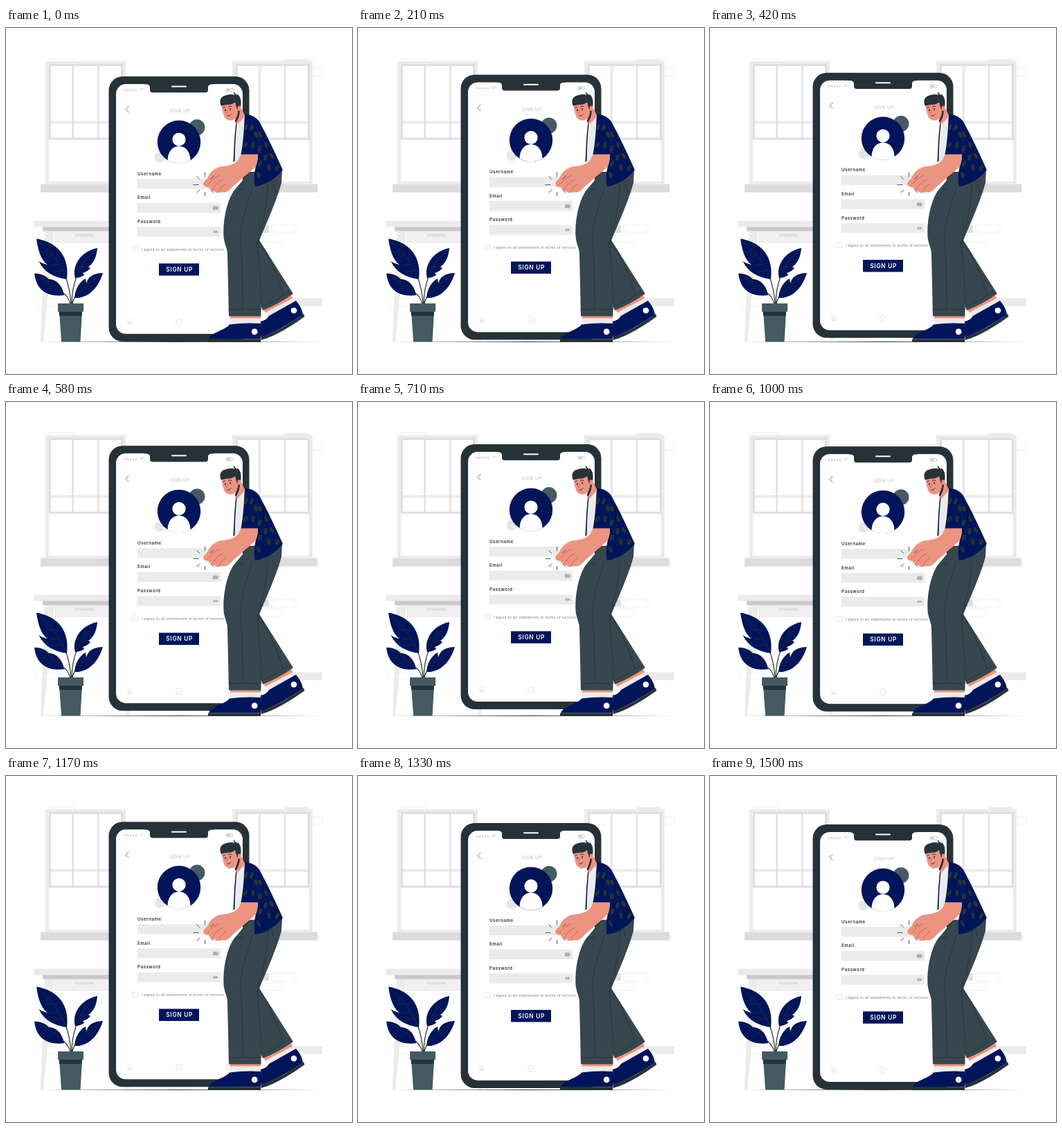
Write an HTML page that moves like this. It is 500x500 px and loops after 1540 ms.

```html
<!DOCTYPE html>
<html lang="en">
<head>
<meta charset="utf-8">
<title>Sign up</title>
<style>
  html, body { margin: 0; width: 100%; height: 100%; overflow: hidden; background: #fff; }
  svg { display: block; width: 100vw; height: 100vh; }
  text { font-family: Inter, "Open Sans", sans-serif; }
  .navy { fill: #02155a; }
  .dark { fill: #263238; }
  .slate { fill: #455a64; }
  .trouser { fill: #37474f; }
  .skin { fill: #eb9481; }
  .white { fill: #fff; }
  .field { fill: #ebebeb; }
  .line { fill: none; stroke: #263238; stroke-linecap: round; stroke-linejoin: round; }
  .crease { fill: none; stroke: #b7625a; stroke-linecap: round; }
  .faint { fill: none; stroke: #ececec; }
  .icon { fill: none; stroke: #dedede; }
  .label { fill: #263238; font-size: 6.2px; font-weight: 600; letter-spacing: .5px; }
</style>
</head>
<body>
<svg viewBox="0 0 500 500" stroke-width=".8">
  <defs>
    <g id="window">
      <path fill="#ebebeb" d="M57 48h116v177H57z"/>
      <path class="white" d="M62 161h106v61H62z"/>
      <path fill="#fff" stroke="#dedede" stroke-width="3" d="M63.500 53.500h104V160h-104z"/>
      <path fill="#ebebeb" d="M65 134.500h101v4H65z"/>
      <path fill="none" stroke="#dedede" stroke-width="2.200" d="M96.500 54v105M133.300 54v105"/>
    </g>
  </defs>

  <g id="room">
    <use href="#window"/>
    <use href="#window" x="270"/>
    <path fill="#dcdcdc" d="M50 225.500h130v12H50zM320 225.500h130.500v12H320z"/>
    <path fill="#ebebeb" d="M402 45h36v4h-36zM400 390.500h57V402h-57z"/>
    <path class="faint" d="M62 48v-3.500h36V48M442 58.500h15v11h-15M384 285h35v11h-35zM371 299h28v10.500h-28zM75 390.500H43.500v11H75M96 377h24v12"/>
    <path fill="#e0e0e0" d="M352 285h28v11h-28z"/>
    <path fill="#ebebeb" d="M40 278.500h120v9H40zM56 293h14l-16 160h-4zM172 293h6v160h-4z"/>
    <path fill="#f0f0f0" stroke="#e2e2e2" d="M71 293h85v17H71z"/>
    <path fill="#c9c9c9" d="M53 287.500h107v6H53z"/>
    <path fill="#dedede" d="M100 297.500h27v4h-27z"/>
  </g>

  <path class="dark" d="M43 453.500L250 453l207 .5L250 454z"/>

  <g id="phone">
    <rect class="dark" x="148.500" y="70.300" width="203" height="383" rx="20"/>
    <rect class="white" x="159" y="81.300" width="183" height="361" rx="14"/>
    <path class="dark" d="M200 80h100v1.500c-7 0-8 2-8 5v3q0 4-4 4H212q-4 0-4-4v-3c0-3-1-5-8-5z"/>
    <path stroke="#fff" stroke-width="2" stroke-linecap="round" d="M240 84.700h20"/>
    <g fill="none" stroke="#c8c8c8">
      <path stroke-width="2.400" stroke-linecap="round" stroke-dasharray="0 4" d="M172 89.800h17"/>
      <path d="M193 88.500q3-2.500 6 0M194.500 90.300q1.500-1.200 3 0M318 87.500h9v4.500h-9zM328.500 89v1.500"/>
      <path stroke-width="2.500" d="M319 89.700h5"/>
      <path stroke="#b4b4b4" stroke-width="1.400" d="M177.500 113.300l-4.500 4.500 4.500 4.500"/>
    </g>
    <text x="236" y="122.500" font-size="6.600" font-weight="500" letter-spacing=".45" fill="#c6c6c6">SIGN UP</text>

    <circle class="slate" cx="276" cy="143.800" r="11.500"/>
    <circle cx="222" cy="187.300" r="7.500" fill="#e6e6e6"/>
    <circle class="navy" cx="250" cy="165" r="31.200"/>
    <circle class="white" cx="250" cy="161.300" r="9.600"/>
    <path class="white" d="M233.500 191.500c0-12 7-20.500 16.500-20.500s16.500 8.500 16.500 20.500q-16.500 9.500-33 0z"/>

    <g id="form"></g>
    <path fill="#a6a6a6" d="M299 257.800h7.500v5H299z"/>
    <path fill="none" stroke="#ddd" stroke-width=".6" d="M299 258l3.700 2.500 3.800-2.500"/>
    <ellipse cx="302.700" cy="294.700" rx="3.500" ry="1.700" fill="#a6a6a6"/>
    <circle cx="302.700" cy="294.700" r=".8" fill="#ddd"/>

    <path fill="none" stroke="#e0e0e0" d="M183.500 316h7v7h-7z"/>
    <text x="196" y="321.800" font-size="5.200" letter-spacing=".3" fill="#6f787c">I agree to all statements in terms of service</text>
    <path class="navy" d="M221 340.500h58V358h-58z"/>
    <text x="231.200" y="352.200" font-size="8.300" font-weight="600" letter-spacing=".75" fill="#fff">SIGN UP</text>

    <path class="icon" d="M174.500 425l4-4 4 4M176 424v4.500h1.500v-3h2v3h1.500V424"/>
    <circle class="icon" cx="250.300" cy="425.300" r="4.800"/>
    <path class="icon" d="M248 425l2 2 3-3.500M317 421.500h10M317 425h10M317 428.500h10"/>
  </g>

  <g id="plant">
    <path class="line" stroke-width="1.200" d="M94 399C93 385 91 372 86 360M95 399C95 383 98 370 102 359M93 399Q90 387 81 382M96 399Q96 393 102 386"/>
    <path class="navy" d="M44 304.500C66 308 93 323 88 363C70 361 55 353 47.500 337Q53 341 60 342C49 334 46 318 44 304.500z"/>
    <path class="navy" d="M132 318C108 323 95 343 100 361.500Q108 360.500 113 357l-2-3Q118 352 122 347l-3-2C127 340 131 330 132 318z"/>
    <path class="navy" d="M41 355C49 354 57 358 62 363C73 363 82 373 84 386C64 389 44 382 41 355z"/>
    <path class="navy" d="M140 354C131 354 124 357 120 361Q117 365 116 369l-1-7C106 367 100 377 99 390C118 391 133 377 140 354z"/>
    <path class="line" stroke-width=".7" d="M47 308Q75 330 86 360M58 318l1 11M68 329l-10 1M76 341l-12 2M72 334l3-8M81 350l-10 3M130 321Q109 338 102 359M113 338v-8M108 346l11-2M44 357Q64 365 82 382M58 366l-3 6M68 372l-6 5M137 357Q115 371 102 386M116 373l10 1"/>
    <path class="slate" d="M77 410h33l-2.500 43.500H80z"/>
    <path class="dark" d="M76.500 409h33.500l-.5 7H77z"/>
    <path class="slate" d="M75 398h37v12H75z"/>
  </g>

  <g id="man">
    <path class="skin" d="M372 407l40-21 4 8-40 19z"/>
    <path fill="#ebebeb" d="M374 411.500l40.500-21 5 7-40 22z"/>
    <path class="navy" d="M369 447L368 424Q377 422 380 416L419 394C424 400 428 406 429 414Q398 436 369 447z"/>
    <path class="dark" d="M369 446C390 440 412 426 430 413l1.500 4C412 431 390 445 368.500 451z"/>
    <circle class="white" cx="416" cy="408.300" r="4.300"/>

    <path class="skin" d="M324 415h44v6h-44z"/>
    <path fill="#ebebeb" d="M324 419.500h44v9h-44z"/>
    <path class="navy" d="M293 449.500C297 439 315 438 323 428.500q22-3 45-1.500C370 435 369.500 443 368 449.500z"/>
    <path class="dark" d="M292 449.500h76.500l-.5 4.500H292z"/>
    <circle class="white" cx="359.200" cy="438.800" r="4.400"/>

    <path class="trouser" d="M365 305L415 384Q394 399 371 408L345 330z"/>
    <path class="trouser" d="M352 208L333 231C323 240 313 270 314.500 302C316 314 320 319 320 326L322 416.500h46.500L369 355 366 307C376 283 391 250 398 224L399 206z"/>
    <path class="line" d="M322 406.500h46.500M369.500 403Q391 393 411 379.500M366 307C360 318 368 340 369 405M356 229C352 250 334 285 340 320Q342 360 342 405M378 224C378 250 372 285 362 312M366 309C385 340 394 365 400 385M384 221q0 14 10 17M333 232l10 2"/>

    <path fill="#ebebeb" d="M333 135L346 125 342 184 329.500 194z"/>
    <path class="navy" d="M333 128Q329.500 160 328.500 194l2-1.500Q331 160 334 135z"/>
    <path class="navy" d="M345 124.500C354 125 363 129 367 137C379 159 390 183 400 205C389 219 372 228 360 229C357 214 360 202 364 188V183H339.500C343 165 344 145 345 124.500z"/>
    <g id="pattern" class="dark"></g>
    <path class="line" stroke-width=".6" d="M362 140Q366 160 364 184"/>

    <path class="skin" d="M340 182.500h24C364 192 363 198 359 202L327 230C322 236 317 239 311 237Q305 240 301 236Q296 236 293 230C288 230 284 228 285.500 223C288 220 291 218 293 213C298 205 304 201 313 200C324 199 332 196 336 190z"/>
    <path class="crease" d="M308 213Q299 217 291 227M313 219Q303 224 299 233M318 225Q311 229 308 236"/>

    <path class="skin" d="M330 120L340 116 345.500 127Q338 136 333 141z"/>
    <path class="skin" d="M310.500 108C313 116 313 126 317 130.500C323 136 331 134 335 126L340 112 330 100z"/>
    <path class="dark" d="M338 117Q338 129 332 137L330.500 134Q335 127 335.500 119z"/>
    <path class="dark" d="M311 113C307 104 311 99 317 97.500C322 95.500 327 95.500 331 97Q328 95 329.500 92Q331 96 335 97l-1-2C339 99 340 104 339.500 111L337 117 334 118 331 107C325 113 318 109 311 113z"/>
    <ellipse class="skin" cx="337" cy="116" rx="2.500" ry="3.500"/>
    <ellipse class="dark" cx="317" cy="118.500" rx="1" ry="1.500"/>
    <ellipse class="dark" cx="324" cy="117.300" rx="1" ry="1.500"/>
    <path class="line" stroke-width="1" d="M313.500 115.500l3-1.500M321.500 113.500q2.500-1.500 4.500 0M320 127q3 .5 5-2"/>
    <path class="crease" d="M320 118l-1.500 5 2 .5"/>
    <path class="line" d="M287.500 209v6M271 226.500h7M287.500 237.500v5M275.500 214.500l4 4M300 214l-4 4M276 238l4-4M300 238l-4-4"/>
  </g>
</svg>
<script>
  const byId = id => document.getElementById(id);

  byId("form").innerHTML = ["Username", "Email", "Password"].map((name, i) => {
    const y = 213 + i * 34.6;
    return `<text class="label" x="190" y="${y}">${name}</text>
      <rect class="field" x="189.500" y="${y + 5.3}" width="121" height="14.300"/>`;
  }).join("");

  const spots = [[347, 143, 20], [355, 144, 25], [361, 154, -20], [346, 169, 30], [357, 169, 10],
    [367, 154, -25], [367, 174, 15], [376, 169, -20], [375, 187, 10], [384, 185, -30],
    [367, 196, 25], [380, 202, -10], [392, 202, 25], [365, 213, -20]];
  byId("pattern").innerHTML = spots.map(([x, y, turn]) =>
    `<ellipse rx="2.400" ry="4.700" transform="translate(${x} ${y}) rotate(${turn})"/>`).join("");

  // The phone bobs at constant speed, stepped at 24 frames per second.
  const LOOP = 1540, BOB = 1500, FPS = 24, LEAD = 20, HEIGHT = 9.5;
  const phone = byId("phone");

  function draw() {
    const t = performance.now() % LOOP;
    const step = Math.floor(t * FPS / 1000 + 0.05) * 1000 / FPS;
    const phase = (step + LEAD) % BOB / (BOB / 2);
    const lift = HEIGHT * (1 - Math.abs(phase - 1));
    phone.setAttribute("transform", `translate(0 ${-lift})`);
    requestAnimationFrame(draw);
  }
  draw();
</script>
</body>
</html>
```
